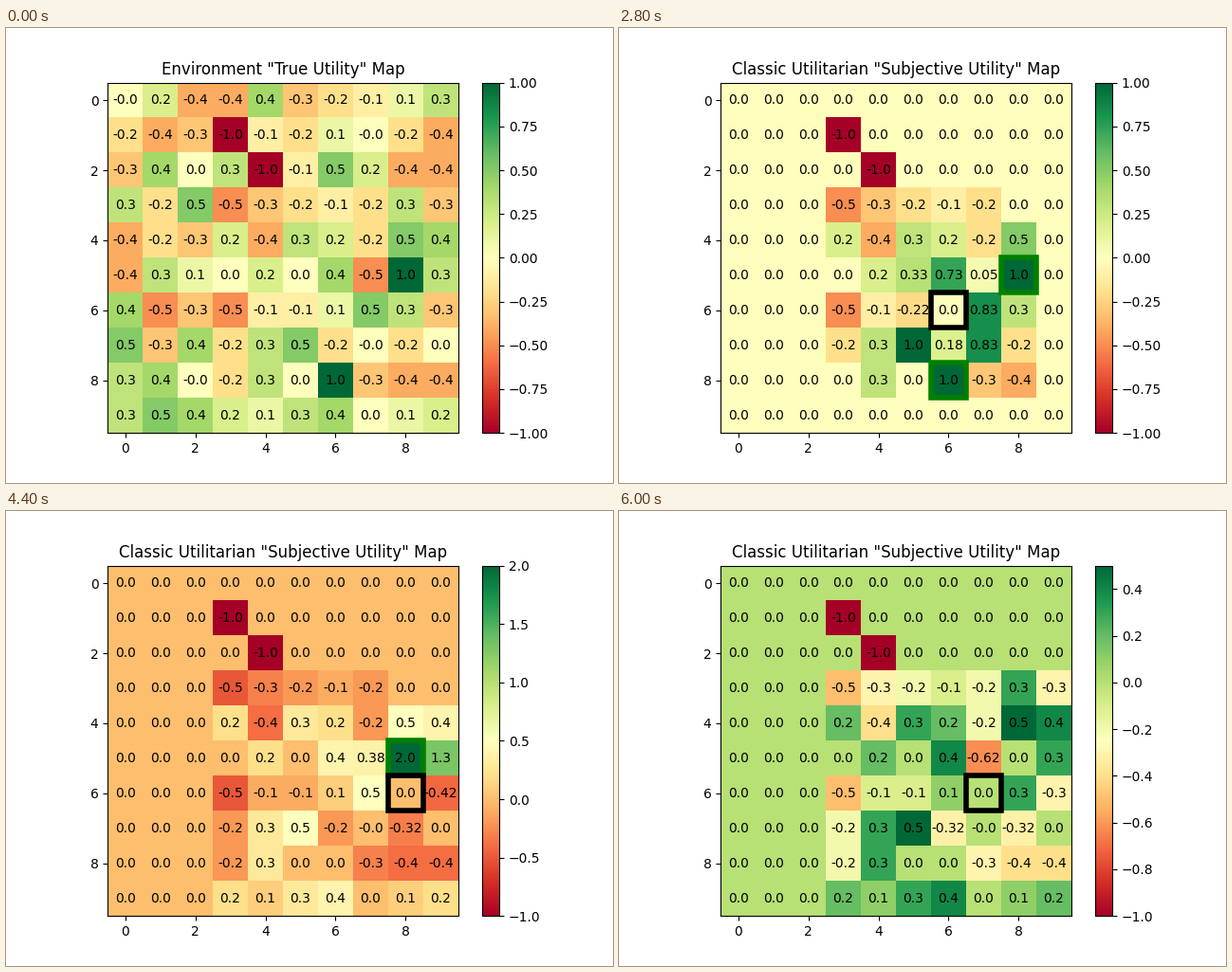
A matplotlib script that plays this animation: 640x480 px, repeating every 6400 ms.

```python
import numpy as np
import matplotlib.pyplot as plt
from matplotlib.animation import FuncAnimation
from matplotlib.patches import Rectangle

plt.rcParams["font.family"] = "DejaVu Sans"

STEP_MS = 400
INTRO = 5       # frames the true map is held
STEPS = 11      # frames of the walk
START = (5, 5)
SIGHT = 2
DREAD = 0.12    # extra weight of an unpleasant neighbour

UTILITY = np.array([
    [-0.0, 2, -4, -4, 4, -3, -2, -1, 1, 3],
    [-2, -4, -3, -10, -1, -2, 1, -0.0, -2, -4],
    [-3, 4, 0, 3, -10, -1, 5, 2, -4, -4],
    [3, -2, 5, -5, -3, -2, -1, -2, 3, -3],
    [-4, -2, -3, 2, -4, 3, 2, -2, 5, 4],
    [-4, 3, 1, 0, 2, 0, 4, -5, 10, 3],
    [4, -5, -3, -5, -1, -1, 1, 5, 3, -3],
    [5, -3, 4, -2, 3, 5, -2, -0.0, -2, 0],
    [3, 4, -0.0, -2, 3, 0, 10, -3, -4, -4],
    [3, 5, 4, 2, 1, 3, 4, 0, 1, 2],
]) / 10
SIZE = len(UTILITY)


def neighbours(pos):
    for dr in (-1, 0, 1):
        for dc in (-1, 0, 1):
            r, c = pos[0] + dr, pos[1] + dc
            if (dr or dc) and 0 <= r < SIZE and 0 <= c < SIZE:
                yield (r, c), (dr, dc)


def look(known, world, pos):
    """Reveal the square window around the agent."""
    r, c = (max(p - SIGHT, 0) for p in pos)
    window = np.s_[r:pos[0] + SIGHT + 1, c:pos[1] + SIGHT + 1]
    known[window] = world[window]


def goal_pull(pos, goals):
    """Direction and strength of each goal; nearer goals pull harder."""
    offsets = [(g[0] - pos[0], g[1] - pos[1]) for g in goals]
    dists = [abs(dr) + abs(dc) for dr, dc in offsets]
    return [(np.sign(off), min(dists) / d / len(goals))
            for off, d in zip(offsets, dists)]


def subjective(known, pos, goals):
    view = known.copy()
    view[pos] = 0.0
    pulls = goal_pull(pos, goals)
    for cell, step in neighbours(pos):
        value = view[cell]
        if value < 0:
            value -= DREAD
        gain = sum(w * sum(s != 0 and s == t for s, t in zip(step, way))
                   for way, w in pulls)
        if gain:
            value += gain
        view[cell] = np.round(value, 2)
    return view


def best_step(view, pos):
    best = None
    for cell, _ in neighbours(pos):
        if best is None or view[cell] >= view[best]:
            best = cell
    return best


def walk():
    world = UTILITY.copy()
    known = np.where(abs(world) == 1, world, 0.0)
    goals = [tuple(g) for g in np.argwhere(world == 1)]
    pos = START
    look(known, world, pos)
    first = known.copy()
    first[pos] = 0.0
    states = [(first, pos, list(goals))]
    while len(states) < STEPS:
        if pos in goals:
            goals.remove(pos)
            world[pos] = 0.0
        look(known, world, pos)
        view = subjective(known, pos, goals)
        states.append((view, pos, list(goals)))
        pos = best_step(view, pos)
    return states


STATES = walk()
fig = plt.figure(figsize=(6.4, 4.8), dpi=100)


def frame_cell(ax, cell, color):
    r, c = cell
    ax.add_patch(Rectangle((c - 0.5, r - 0.5), 1, 1, fill=False,
                           edgecolor=color, linewidth=4))


def draw_map(values, title):
    ax = fig.add_subplot()
    image = ax.imshow(values, cmap="RdYlGn")
    fig.colorbar(image, ax=ax)
    ax.set_title(title)
    for (r, c), value in np.ndenumerate(values):
        ax.text(c, r, str(float(value)), ha="center", va="center", color="black")
    return ax


def update(i):
    fig.clear()
    if i < INTRO:
        draw_map(UTILITY, 'Environment "True Utility" Map')
        return []
    view, pos, goals = STATES[i - INTRO]
    ax = draw_map(view, 'Classic Utilitarian "Subjective Utility" Map')
    for goal in goals:
        frame_cell(ax, goal, "green")
    frame_cell(ax, pos, "black")
    return []


anim = FuncAnimation(fig, update, frames=INTRO + STEPS, interval=STEP_MS,
                     init_func=lambda: [], repeat=True, repeat_delay=0, blit=False)
plt.show()
```
